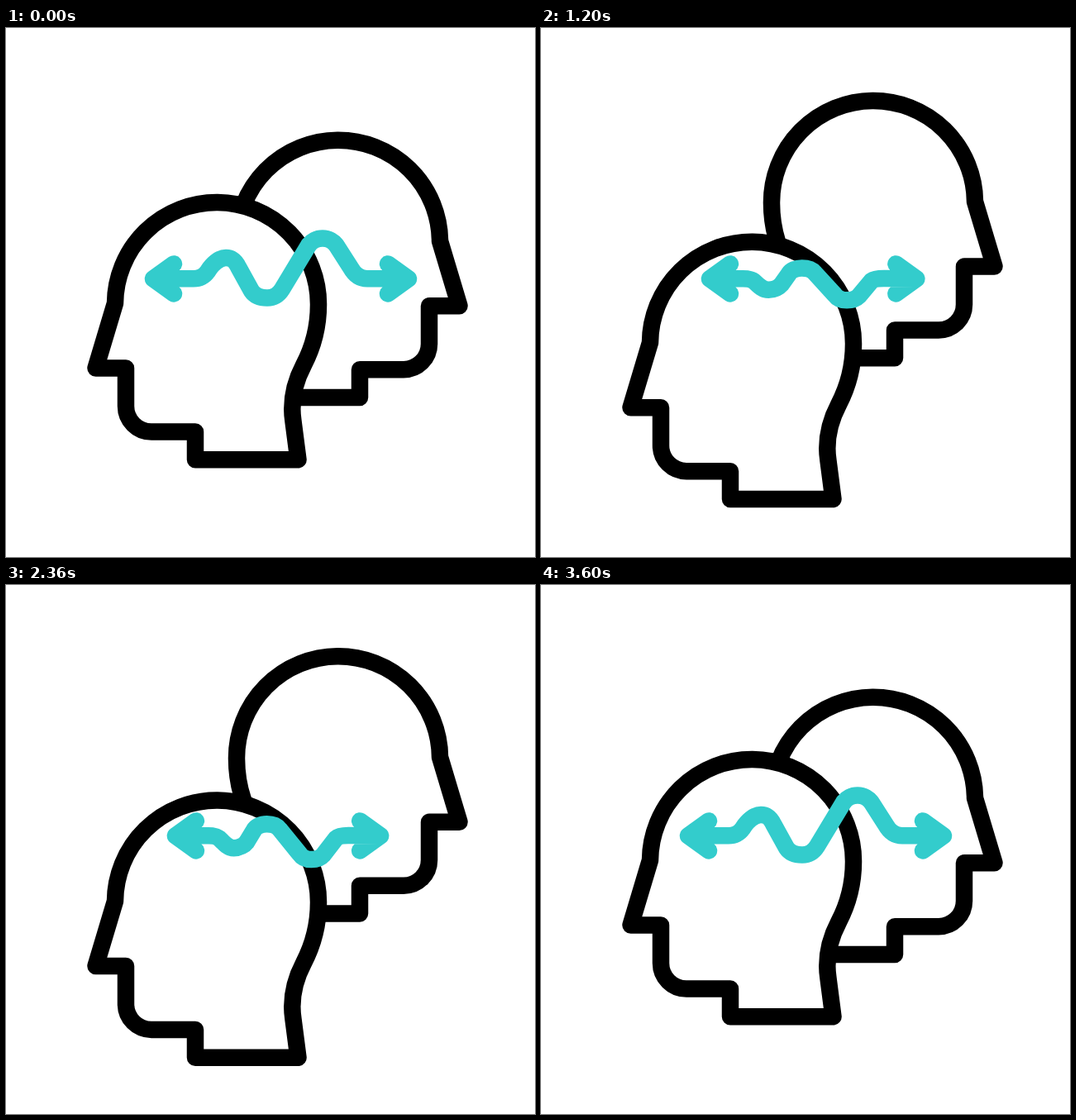
An HTML page for the animation above (3.62 s loop, 640 px wide and 640 px high).

```html
<!DOCTYPE html>
<html>
<head>
<meta charset="utf-8">
<style>
  html, body { margin: 0; height: 100%; overflow: hidden; background: #fff; }
  svg { display: block; width: 100%; height: 100%; }
  path { stroke-width: 20.5; stroke-linecap: round; stroke-linejoin: round; }
</style>
</head>
<body>
<svg viewBox="0 0 640 640">
  <defs>
    <path id="head" fill="#fff" stroke="#000" d="M353.5 522.3H229V488.5H176A31 31 0 0 1 145 457.5V411.5H108.5L132 333
      A123 123 0 0 1 378 335C378 361 371.5 386 360 408C351 425 346.3 443 346.3 461C346.3 466 346.8 471 347.5 476Z"/>
  </defs>
  <use id="back" href="#head"/>
  <use id="front" href="#head"/>
  <path id="wave" fill="none" stroke="#33cccc"/>
</svg>
<script>
const PERIOD = 3620, HALF = 1800, LIFT = 64.3;
const get = id => document.getElementById(id);
const back = get('back'), front = get('front'), wave = get('wave');

// The same curve in its two extreme poses
const apart = `M178 303.3 L227 303.3 C234 303.3 240 300 244 294.5 C249 286 258 278 266 278 S277.5 282 281 289
  L297 318 C301 324 308 326.5 316 326.5 S330 322.5 334 316
  L366 263 C369.5 258 376 254.5 383 254.5 S397 258 401 265
  L417 290 C421.5 298 428.5 303.3 437 303.3 L487 303.3`;
const close = `M213 303.3 L250.3 303.3 C255.2 303.3 260.1 304.8 264.1 312 C268.6 321 272.3 330.3 278.7 330.3 S291.8 324.4 294.3 317.6
  L300.7 290.4 C302.6 282.7 308.5 278 315.5 278 S327.4 282.2 330.3 289.5
  L351.7 343.6 C354.1 350.2 359 355.4 365.5 355.4 S375.8 351.8 378.7 345
  L393.7 311.7 C396.1 306 401.5 303 407.3 303 L443 303.3`;
const number = /[\d.]+/g;
const target = close.match(number).map(Number);

function morph(p) {
  let i = 0;
  return apart.replace(number, n => +n + (target[i++] - n) * p);
}

const arrow = (x, dir) => `M${x + 25 * dir} 285.4L${x} 303.4L${x + 25 * dir} 321.4`;

function draw(now) {
  const t = now % PERIOD;
  const u = Math.max(0, 1 - Math.abs(t - HALF) / HALF);
  const p = u * u * (3 - 2 * u);
  front.setAttribute('transform', `translate(0 ${LIFT * p})`);
  back.setAttribute('transform', `translate(657 ${-75.3 - LIFT * p}) scale(-1 1)`);
  wave.setAttribute('d', morph(p) + arrow(178 + 35 * p, 1) + arrow(487 - 44 * p, -1));
}

const start = performance.now();
function tick() {
  draw(performance.now() - start);
  requestAnimationFrame(tick);
}
tick();
</script>
</body>
</html>
```
